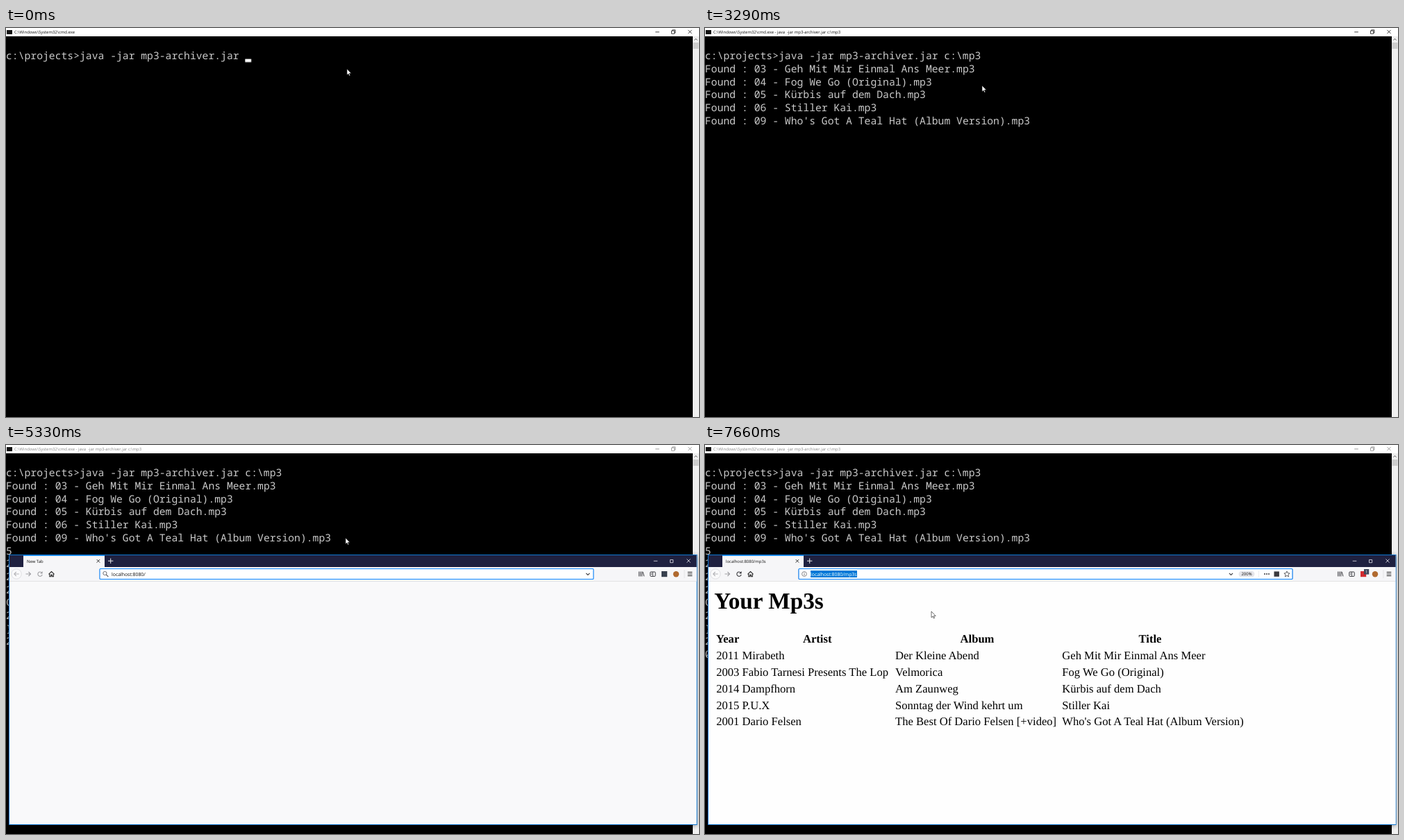
Animation, 998 px wide and 561 px high, one loop 8000 ms. Source, as an HTML page:

```html
<!DOCTYPE html>
<html lang="en">
<head>
<meta charset="utf-8">
<title>Console and browser</title>
<style>
  html, body { margin: 0; height: 100%; overflow: hidden; background: #000; }
  svg { display: block; width: 100vw; height: 100vh; }
  text { white-space: pre; text-rendering: geometricPrecision; }
  .term { font: 14.72px "Noto Sans Mono", "DejaVu Sans Mono", monospace; fill: #cacaca; }
  .ui { font: 5.95px "Open Sans", "Noto Sans", sans-serif; fill: #111; }
  .url { font: 6.87px "Open Sans", "Noto Sans", sans-serif; fill: #0c0c0d; }
  .page { font: 16.63px "Liberation Serif", "Noto Serif", serif; fill: #000; }
  .bold { font-weight: bold; }
  .mid { text-anchor: middle; }
  .h1 { font-size: 33.27px; }
</style>
</head>
<body>
<svg id="stage" viewBox="0 0 998 561" preserveAspectRatio="none"></svg>
<script>
const LOOP = 8000, CHAR = 8.83, LINE = 18.7, TOP = 12;
const BLUE = '#0a84ff', DARK = '#3a3a3f', PALE = '#b4b4b8';
const stage = document.getElementById('stage');

function add(tag, attrs, parent = stage, str) {
  const node = document.createElementNS('http://www.w3.org/2000/svg', tag);
  for (const k in attrs) node.setAttribute(k, attrs[k]);
  if (str !== undefined) node.textContent = str;
  return parent.appendChild(node);
}
const group = (parent, attrs = {}) => add('g', attrs, parent);
const rect = (parent, x, y, width, height, fill, more = {}) =>
  add('rect', { x, y, width, height, fill, ...more }, parent);
const line = (parent, d, stroke = DARK, width = 1) =>
  add('path', { d, stroke, fill: 'none', 'stroke-width': width }, parent);
const circle = (parent, cx, cy, r, fill, stroke = 'none', width = .8) =>
  add('circle', { cx, cy, r, fill, stroke, 'stroke-width': width }, parent);
const label = (parent, x, y, cls, str, more = {}) =>
  add('text', { x, y, class: cls, ...more }, parent, str);

// steps: [time, properties, easing]
function track(node, steps) {
  const frames = steps.map(([t, props, easing = 'step-end']) => ({ offset: t / LOOP, easing, ...props }));
  frames.push({ ...steps[steps.length - 1][1], offset: 1 });
  node.animate(frames, { duration: LOOP, iterations: Infinity });
  return node;
}
function show(node, from, to = LOOP) {
  const steps = [];
  if (from > 0) steps.push([0, { opacity: 0 }]);
  steps.push([from, { opacity: 1 }]);
  if (to < LOOP) steps.push([to, { opacity: 0 }]);
  return track(node, steps);
}
const move = (x, y) => ({ transform: `translate(${x}px, ${y}px)` });

function controls(parent, xs, y, color, restore) {
  const [a, b, c] = xs;
  line(parent, `M${a - 2.8} ${y + .3}h5.6`, color, .8);
  line(parent, `M${b - 2.5} ${y - 1.5}h4.2v4.2h-4.2z` + (restore ? `m1.2 0v-1.2h4.2v4.2h-1.2` : ''), color, .8);
  line(parent, `M${c - 2.6} ${y - 2.6}l5.2 5.2m0 -5.2l-5.2 5.2`, color, .8);
}

// Console
function drawConsole() {
  rect(stage, 0, 0, 998, 561, '#000');
  rect(stage, 0, 0, 998, 12, '#fff');
  rect(stage, 1, 3, 8, 6, '#111');
  const bar = group(stage);
  track(bar, [[0, { opacity: 1 }], [4660, { opacity: .5 }]]);
  const title = 'C:\\Windows\\System32\\cmd.exe';
  show(label(bar, 12, 8.2, 'ui', title), 0, 1660);
  show(label(bar, 12, 8.2, 'ui', title + ' - java  -jar mp3-archiver.jar c:\\mp3'), 1660);
  controls(bar, [938, 961, 985], 5.5, '#111', true);

  rect(stage, 989, 12, 9, 549, '#f0f0f0');
  rect(stage, 989.5, 21, 8, 9, '#cdcdcd');
  line(stage, 'M991.5 17.5l2 -2l2 2', '#555', 1);

  const row = (r, str, time, col = 0) => {
    const t = label(stage, col * CHAR, TOP + LINE * r + 14.6, 'term', str);
    if (time) show(t, time);
  };
  row(1, 'c:\\projects>java -jar mp3-archiver.jar ');
  const keys = [330, 510, 850, 1220, 1290, 1440];
  [...'c:\\mp3'].forEach((ch, i) => row(1, ch, keys[i], 39 + i));

  const found = [
    [1810, '03 - Geh Mit Mir Einmal Ans Meer'],
    [1810, '04 - Fog We Go (Original)'],
    [1845, '05 - Kürbis auf dem Dach'],
    [1845, '06 - Stiller Kai'],
    [1880, "09 - Who's Got A Teal Hat (Album Version)"]
  ];
  found.forEach(([t, name], i) => row(2 + i, `Found : ${name}.mp3`, t));

  const stamp = '2018-06-30 16:14:08.';
  const log = [
    [3660, '5'],
    [3980, stamp + '330:INFO::main: Logging initialized @5054ms'],
    [4020, stamp + '371:INFO:oejs.Server:main: jetty-9.2.z-SNAPSHOT'],
    [4050, stamp + '394:INFO:oejsh.ContextHandler:main: Started o.e.j.s.ServletContextHandler@28f3b248{/,file:/'],
    [4050, 'C:/Users/heiko/AppData/Local/Temp/,AVAILABLE}'],
    [4090, stamp + '457:INFO:oejs.ServerConnector:main: Started ServerConnector@5b03b9fe{HTTP/1.1}{0.0.0.0:8080'],
    [4090, '}'],
    [4110, stamp + '459:INFO:oejs.Server:main: Started @5185ms'],
    [5440, '0']
  ];
  log.forEach(([t, str], i) => row(7 + i, str, t));

  const caret = rect(stage, 0, 13.9, 8.8, 4.6, '#fff');
  const spots = [[0, 39, 1], [330, 40, 1], [510, 41, 1], [850, 42, 1], [1030], [1220, 43, 1],
    [1290, 44, 1], [1440, 45, 1], [1510], [2590, 0, 7], [3120]];
  track(caret, spots.map(([t, c, r]) =>
    [t, { opacity: r ? 1 : 0, ...move((c || 0) * CHAR, TOP + LINE * (r || 0)) }]));
}

// Browser icons
function library(p, x) {
  line(p, `M${x - 3.3} 182.5v7M${x - 1.2} 182.5v7M${x + .9} 182.5v7M${x + 2} 182.8l2 6.6`);
}
function sidebar(p, x) {
  add('rect', { x: x - 3.7, y: 183, width: 7.4, height: 6.4, rx: 1, fill: 'none', stroke: DARK }, p);
  line(p, `M${x} 183v6.4M${x - 2.4} 185h1.4m-1.4 1.6h1.4`, DARK, .8);
}
const chevron = (p, x) => line(p, `M${x - 2.6} 184.8l2.6 2.6l2.6 -2.6`, DARK, 1.1);
function reload(p, color) {
  line(p, 'M51.6 184.2a3.2 3.2 0 1 0 .6 2.6', color, 1.1);
  add('path', { d: 'M52.6 182v3.4h-3.4z', fill: color }, p);
}
const field = (p, width, stroke) =>
  rect(p, 135, 178.5, width, 15, '#fff', { stroke, rx: 1, 'stroke-width': stroke === BLUE ? 1.1 : .8 });

function drawChrome(win) {
  rect(win, 4.5, 158.5, 990.5, 389, '#f9f9fa', { stroke: '#0f78d4', style: 'filter:drop-shadow(0 1px 3px rgba(0,0,0,.4))' });
  rect(win, 5, 159, 989.5, 17, '#1f2140');
  rect(win, 25, 159, 117, 17.5, '#f6f6f8');
  const burst = rect(group(win, { transform: 'translate(25 160)' }), 0, 0, 117, 16, '#a6d0fb');
  track(burst, [
    [0, { opacity: 0, transform: 'scaleX(0)' }],
    [5620, { opacity: 1, transform: 'scaleX(.08)' }, 'linear'],
    [5820, { opacity: .8, transform: 'scaleX(1)' }, 'linear'],
    [6200, { opacity: 0, transform: 'scaleX(1)' }]
  ]);
  rect(win, 25, 158.5, 117, 1.4, BLUE);
  show(label(win, 30, 169.8, 'ui', 'New Tab'), 0, 5440);
  show(label(win, 30, 169.8, 'ui', 'localhost:8080/mp3s'), 5440);
  line(win, 'M130.6 165l4.6 4.6m0 -4.6l-4.6 4.6', '#222', .9);
  line(win, 'M147 167.2h7.4m-3.7 -3.7v7.4', '#eee', 1);
  controls(win, [935.5, 959, 983], 167, '#e8e8ee', false);

  rect(win, 5, 176, 989.5, 20.5, '#f6f6f8');
  rect(win, 5, 196, 989.5, .8, '#dcdcde');
  circle(win, 15, 186, 7.2, '#fafafb', '#d4d4d8', .7);
  line(win, 'M18.8 186h-7m3 -3l-3 3l3 3', PALE, 1.1);
  line(win, 'M28.5 186h7m-3 -3l3 3l-3 3', '#a0a0a4', 1.1);
  reload(show(group(win), 0, 5440), '#a0a0a4');
  line(show(group(win), 5440, 5940), 'M45.5 182.5l7 7m0 -7l-7 7', '#8a8a8e', 1.1);
  reload(show(group(win), 5940), DARK);
  line(win, 'M61.5 186.4l4 -3.8l4 3.8M62.8 186v3.8h2v-2.4h1.6v2.4h2v-3.8', '#222', 1.1);
  line(win, 'M977 180v12', '#dcdcde', .7);
  line(win, 'M981.7 183.4h6.6m-6.6 2.6h6.6m-6.6 2.6h6.6', '#222', 1);

  const bare = show(group(win), 0, 4920);
  field(bare, 744, BLUE);
  chevron(bare, 871);
  library(bare, 948);
  sidebar(bare, 965);

  const full = show(group(win), 4920);
  library(full, 915);
  sidebar(full, 931.5);
  track(rect(full, 944, 182, 8.2, 8.2, '#38404e'),
    [[0, { fill: '#38404e' }], [6000, { fill: '#d22b30' }]]);
  circle(full, 965, 186.3, 4.2, '#b06a30');
  const badge = show(group(full), 6480);
  rect(badge, 949, 179, 7.2, 7.6, '#40485c');
  label(badge, 952.6, 185, 'ui mid', '1', { style: 'fill:#fff' });
  field(full, 711, '#c4c4c8');
  show(field(full, 711, '#a2a2a8'), 6440);
  show(field(full, 711, BLUE), 4920, 5440);
  show(field(full, 711, BLUE), 7110);
  chevron(show(group(full), 4920, 5440), 838);
  chevron(show(group(full), 6440), 757.5);
}

function drawAddress(win) {
  const find = show(group(win), 0, 5440);
  circle(find, 142.4, 185, 2.6, 'none', '#6a6a6e', 1);
  line(find, 'M144.3 187l3 3', '#6a6a6e', 1.2);
  show(label(win, 152, 188.7, 'url', 'Search with Quelbo or enter address', { style: 'fill:#767678' }), 0, 5000);

  const host = 'localhost', address = host + ':8080/mp3s';
  const typed = [[5000, 1], [5060, 3], [5130, 6], [5200, 10], [5270, 15], [5340, 19]];
  typed.forEach(([t, n], i) =>
    show(label(win, 152, 188.7, 'url', address.slice(0, n)), t, i < 5 ? typed[i + 1][0] : 5440));

  const set = show(group(win), 5440);
  circle(set, 143, 186, 3.4, 'none', '#6a6a6e');
  line(set, 'M143 185.4v2.6m0 -4.2v.9', '#6a6a6e', .9);
  const text = label(set, 152, 188.7, 'url', host);
  add('tspan', { fill: '#77777a' }, text, address.slice(host.length));
  for (const x of [806, 809, 812]) circle(set, x, 186, 1, DARK);
  rect(set, 819.5, 182.4, 7.4, 7.4, DARK);
  line(set, 'M838 182l1.2 2.7l2.9 .3l-2.2 2l.7 2.9l-2.6 -1.5l-2.6 1.5l.7 -2.9l-2.2 -2l2.9 -.3z', DARK, .8);

  const zoom = show(group(win), 5620);
  rect(zoom, 768.5, 181.8, 23, 8.6, '#e6e6ea', { rx: 4.3 });
  label(zoom, 780, 188.3, 'ui mid', '200%');
  line(zoom, 'M797.5 181v10', '#e4e4e8', .7);

  const pick = group(win);
  rect(pick, 152, 181, 67, 10, '#0078d7');
  label(pick, 152, 188.7, 'url', address, { style: 'fill:#fff' });
  track(pick, [
    [0, { opacity: 0, clipPath: 'inset(0 0 0 100%)' }],
    [7110, { opacity: 1, clipPath: 'inset(0 0 0 100%)' }, 'ease-in-out'],
    [7270, { opacity: 1, clipPath: 'inset(0 0 0 0%)' }]
  ]);
}

function drawPage(win) {
  const page = show(group(win), 5620);
  rect(page, 5, 197, 989.5, 350, '#fefefe');
  label(page, 13.3, 236.3, 'page bold h1', 'Your Mp3s');
  const heads = [[32.7, 'Year'], [161.7, 'Artist'], [392, 'Album'], [641, 'Title']];
  heads.forEach(([x, str]) => label(page, x, 285.2, 'page bold mid', str));
  const cols = [16.2, 53.6, 274, 514.3];
  const rows = [
    ['2011', 'Mirabeth', 'Der Kleine Abend', 'Geh Mit Mir Einmal Ans Meer'],
    ['2003', 'Fabio Tarnesi Presents The Lop', 'Velmorica', 'Fog We Go (Original)'],
    ['2014', 'Dampfhorn', 'Am Zaunweg', 'Kürbis auf dem Dach'],
    ['2015', 'P.U.X', 'Sonntag der Wind kehrt um', 'Stiller Kai'],
    ['2001', 'Dario Felsen', 'The Best Of Dario Felsen [+video]', "Who's Got A Teal Hat (Album Version)"]
  ];
  rows.forEach((cells, r) =>
    cells.forEach((str, c) => label(page, cols[c], 308.8 + 23.9 * r, 'page', str)));
}

function drawPointer() {
  const pointer = group(stage);
  const arrow = add('path', {
    d: 'M0 0V8.8L2 7L3.3 10L4.7 9.4L3.4 6.5H6.2Z',
    fill: '#fff', stroke: '#111', 'stroke-width': .6
  }, pointer);
  track(arrow, [[0, { opacity: 1 }], [6440, { opacity: 0 }], [7430, { opacity: 1 }]]);
  const beam = line(pointer, 'M-1.6 -4.6h3.2M0 -4.6v9.2M-1.6 4.6h3.2', '#111', .7);
  show(beam, 6440, 7430);
  const smooth = 'ease-in-out';
  track(pointer, [
    [0, move(491, 59)],
    [2770, move(491, 59), smooth],
    [3290, move(399, 83), smooth],
    [3550, move(489, 134)],
    [5700, move(489, 134), smooth],
    [6400, move(238, 177), 'ease-out'],
    [6660, move(222, 183)],
    [7110, move(222, 183), smooth],
    [7340, move(89, 186), smooth],
    [7660, move(326, 240)]
  ]);
}

drawConsole();
const win = show(group(stage), 4660);
drawChrome(win);
drawAddress(win);
drawPage(win);
drawPointer();
</script>
</body>
</html>
```
